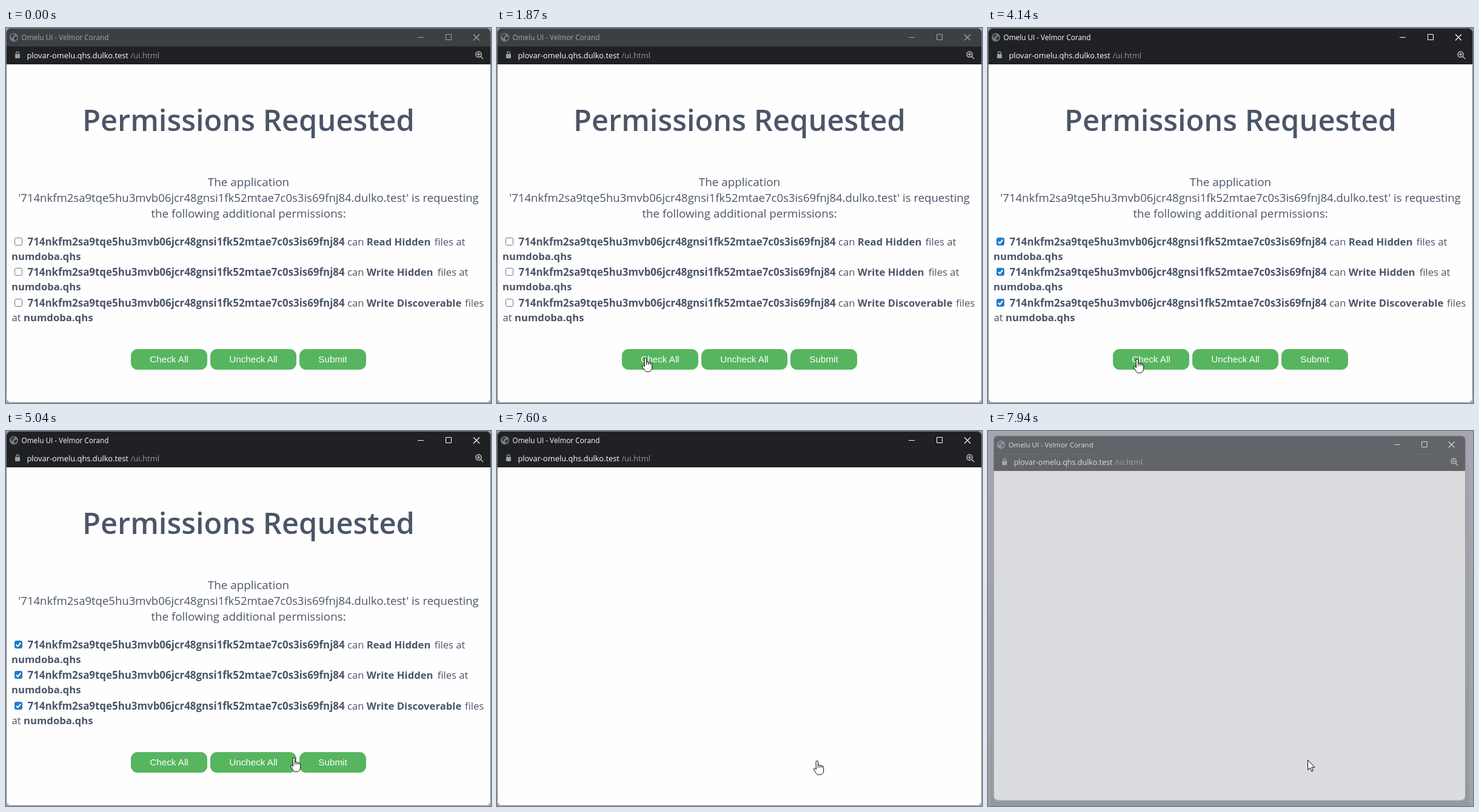
These frames come from a looping animation (800 by 619 pixels, 8 s). An HTML page:

```html
<!DOCTYPE html>
<html lang="en">
<head>
<meta charset="utf-8">
<title>Permissions dialog</title>
<style>
  html, body { margin: 0; width: 100%; height: 100%; overflow: hidden; }
  svg { display: block; width: 800px; height: 619px; }
  text { font-family: "Open Sans", "Noto Sans", sans-serif; white-space: pre; }

  .bar { fill: #3c4043; }
  .title { fill: #a3a6a9; font-size: 11.75px; }
  .controls { fill: none; stroke: #a3a6a9; }
  .active .bar { fill: #1f2124; }
  .active .title { fill: #fff; }
  .active .controls { stroke: #fff; }

  .page text { fill: #4a5568; }
  .page .mid { text-anchor: middle; }
  .heading { font-size: 48.8px; font-weight: 600; }
  .bold { font-weight: 700; }
  .button rect { fill: #57b560; }
  .page .button text { fill: #fff; font: 15.2px "Liberation Sans", Arial, sans-serif; }

  .box rect { fill: #fff; stroke: #767676; }
  .box path { fill: none; stroke: #fff; stroke-width: 2; visibility: hidden; }
  .checked .box rect { fill: #1f7cc8; stroke: #1f7cc8; }
  .checked .box path { visibility: visible; }

  .cursor path { fill: #fff; stroke: #000; stroke-linejoin: round; stroke-linecap: round; }
  .cursor .lines { fill: none; }
</style>
</head>
<body>
<svg id="stage" viewBox="0 0 800 619">
  <defs>
    <linearGradient id="desk" x2="0" y2="1">
      <stop stop-color="#a8a6b2"/><stop offset="1" stop-color="#9fa1a9"/>
    </linearGradient>
    <linearGradient id="shade" x2="0" y2="1">
      <stop stop-color="#a5a4ae"/><stop offset=".4" stop-color="#9fa1a9"/><stop offset="1" stop-color="#949a9c"/>
    </linearGradient>
    <clipPath id="frame"><rect width="800" height="619" rx="8"/></clipPath>
  </defs>

  <rect width="800" height="619" fill="url(#desk)"/>
  <rect x="4" y="2" width="790" height="625" rx="10" fill="url(#shade)"/>

  <g id="win">
    <rect width="800" height="619" rx="8" fill="#b2b4bb"/>
    <g id="body" clip-path="url(#frame)">
      <rect width="800" height="619" fill="#fefefe"/>
      <rect class="bar" width="800" height="31"/>
      <rect y="30.5" width="800" height="29.5" fill="#202124"/>

      <circle cx="13" cy="15.5" r="7" fill="#777b7f"/>
      <path d="M8 12.5l3-2.5 3.5.5-1 2.5-2.5 1 .5 2-2.5.5zM13.5 15l4-1 1.5 2-3 4-2 .5z" fill="#33363a"/>
      <text class="title" x="25.5" y="20">Omelu UI - Velmor Corand</text>
      <path class="controls" d="M679 15.5h10M725.5 10.5h9v9h-9z"/>
      <path class="controls" stroke-width="1.2" d="M771 10.5l10 10M781 10.5l-10 10"/>

      <rect x="15" y="43" width="8" height="7" rx="1" fill="#9aa0a6"/>
      <path d="M16.7 43v-1.5a2.3 2.3 0 0 1 4.6 0v1.5" fill="none" stroke="#9aa0a6" stroke-width="1.3"/>
      <text x="34.5" y="49.8" font-size="12.85" font-weight="500" fill="#fff">plovar-omelu.qhs.dulko.test</text>
      <text x="205.5" y="49.8" font-size="13.05" fill="#9497a0">/ui.html</text>
      <g fill="none" stroke="#bdc1c6" stroke-width="1.5">
        <circle cx="779.5" cy="43.5" r="4.5"/>
        <path d="M783 47l4 4M777 43.5h5M779.5 41v5"/>
      </g>

      <g id="page" class="page">
        <text class="mid heading" x="400" y="169.5">Permissions Requested</text>
      </g>
      <rect x=".5" y=".5" width="799" height="618" rx="8" fill="none" stroke="#77787b"/>
    </g>
  </g>

  <g id="cursor" class="cursor">
    <path id="arrow" d="M.5.5v16l3.7-3.5 2.7 6 2.4-1-2.6-5.8h5z"/>
    <g id="hand" transform="translate(1 1)">
      <path d="M-1.9 2.2a1.8 1.8 0 0 1 3.6 0v5.6c.6-.9 3-.8 3.2.6c.8-.7 2.9-.5 3.1.8c1-.6 2.7 0 2.7 1.6v5.2c0 4-2.2 7.4-6 7.4h-2c-2.4 0-3.6-1.3-4.8-3.2l-3.4-5.3c-1-1.6.8-2.9 2.2-1.7l1.4 1.4z"/>
      <path class="lines" d="M1.7 7.8v3.7M4.9 8.4v3.1M8 9.2v2.3"/>
    </g>
  </g>
</svg>

<script>
const LOOP = 8000;
const APP = '714nkfm2sa9tqe5hu3mvb06jcr48gnsi1fk52mtae7c0s3is69fnj84';
const SITE = 'numdoba.qhs';
const $ = id => document.getElementById(id);

const label = (x, y, size, str, cls = '') =>
  `<text class="${cls}" x="${x}" y="${y}" font-size="${size}">${str}</text>`;
const bold = (x, y, str, size = 16.7) => label(x, y, size, str, 'bold');
const plain = (x, y, str) => label(x, y, 16.6, str);

const button = (x, w, str) =>
  `<g class="button"><rect x="${x}" y="530" width="${w}" height="34" rx="11"/>
   <text class="mid" x="${x + w / 2}" y="552">${str}</text></g>`;

// One permission: check box, first line, then the wrapped second line.
function row(y, right, filesX, files, siteX) {
  const box = `<g class="box" transform="translate(14 ${y - 13})">
    <rect x=".5" y=".5" width="12" height="12" rx="2"/><path d="M2.8 6.7l2.7 2.7 4.8-5.9"/></g>`;
  const rest = siteX > 20 ? plain(9.5, y + 23.5, 'at') : '';
  return box + bold(35.5, y, APP, 16.9) + plain(563, y, 'can') + bold(594.7, y, right) +
    plain(filesX, y, files) + rest + bold(siteX, y + 23.5, SITE);
}

$('page').innerHTML +=
  label(400, 261, 18.85, 'The application', 'mid') +
  label(400, 287, 18.55, `'${APP}.dulko.test' is requesting`, 'mid') +
  label(400, 313, 18.75, 'the following additional permissions:', 'mid') +
  row(359, 'Read Hidden', 706.7, 'files at', 9) +
  row(409, 'Write Hidden', 711.7, 'files at', 9) +
  row(460, 'Write Discoverable', 757, 'files', 29) +
  button(206, 126, 'Check All') + button(337, 142, 'Uncheck All') + button(484, 110, 'Submit');

// Pointer moves: first step, last step, number of steps, target x, y
const moves = [
  [500, 640, 3, 473, 612],
  [970, 1730, 12, 248, 543],
  [1800, 1870, 2, 244, 543],
  [4140, 4140, 1, 245, 545],
  [4210, 4910, 11, 455, 537],
  [4980, 5040, 2, 474, 538],
  [5100, 5530, 7, 520, 541],
  [5730, 5730, 1, 521, 541],
  [5930, 5930, 1, 523, 542],
  [6260, 6260, 1, 527, 543]
];

function pointer(t) {
  let x = 487, y = 619;
  for (const [from, to, steps, tx, ty] of moves) {
    if (t < from) break;
    const gap = (to - from) / (steps - 1 || 1);
    const done = gap ? Math.floor((t - from) / gap + 0.01) + 1 : steps;
    const p = Math.min(1, done / steps);
    const eased = p * p * (3 - 2 * p);
    x += (tx - x) * eased;
    y += (ty - y) * eased;
  }
  return [Math.round(x), Math.round(y)];
}

const show = (id, on) => $(id).setAttribute('visibility', on ? 'visible' : 'hidden');

function draw(t) {
  const [x, y] = pointer(t);
  const hand = y < 564 && t < 7800;
  const closing = t >= 7940;

  $('stage').classList.toggle('active', t >= 2200);
  $('stage').classList.toggle('checked', t >= 2400);
  $('page').setAttribute('display', t < 7600 ? 'inline' : 'none');
  $('win').setAttribute('transform', closing ? 'translate(8.8 7.5) scale(.974)' : '');
  $('body').setAttribute('opacity', closing ? 0.545 : 1);

  $('cursor').setAttribute('transform', `translate(${x} ${y})`);
  show('arrow', t >= 500 && !hand);
  show('hand', hand);
}

function tick() {
  draw(performance.now() % LOOP);
  requestAnimationFrame(tick);
}
tick();
</script>
</body>
</html>
```
